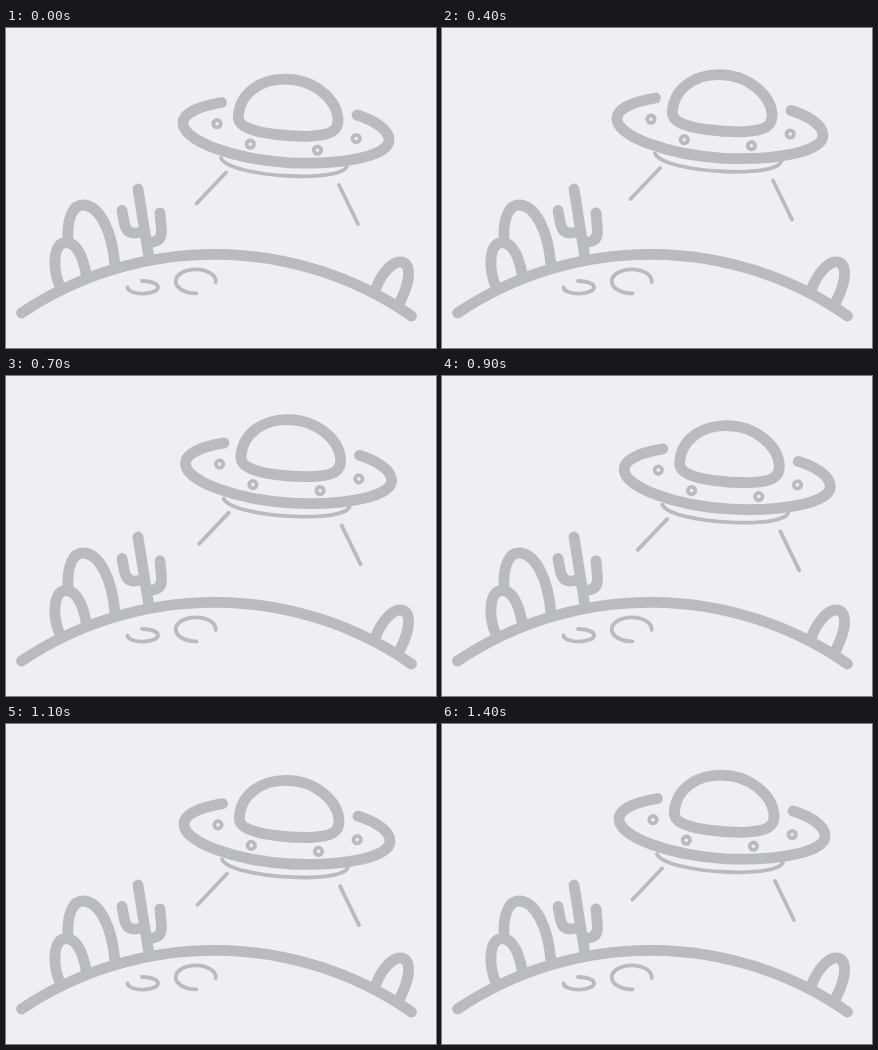
These frames come from a looping animation (430x320 px, 1500 ms). An HTML page:

```html
<!DOCTYPE html>
<html lang="en">
<head>
<meta charset="utf-8">
<title>Hovering saucer</title>
<style>
  html, body { margin: 0; width: 100%; height: 100%; overflow: hidden; background: #efeef4; }
  svg { display: block; fill: none; stroke: #b8bcbf; stroke-linecap: round; stroke-linejoin: round; }
  .bold { stroke-width: 10.8; }
  .fine { stroke-width: 3.8; }
</style>
</head>
<body>
<svg width="430" height="320" viewBox="0 0 430 320">
  <g class="bold" id="land">
    <path d="M15.5 285A346 346 0 0 1 405.500 288"/>
    <path d="M62 211C61 190 67 177 77 177C93 177 106 202 109 237"/>
    <path d="M54 259C46 240 47 214.500 60 214.500C70 214.500 77 228 80 246"/>
    <path d="M132 161L143 230M116 182.500L118.500 196Q121 206 130 205L138 203.500M154 185L155.500 202Q156 212.500 147 214L141 215"/>
    <path d="M370 260C376 245 386 234 394 234C405 234 406 250 394 274"/>
  </g>
  <g class="fine" id="craters">
    <path d="M121.500 259.500A15.300 6.300 0 1 0 136 253"/>
    <path d="M190.500 265.300A20 12 0 1 1 209.700 254"/>
  </g>
  <g id="saucer">
    <g class="bold">
      <path d="M232.500 86C235 65 254 51.200 279 51.200C308 51.200 330 71 332 90C333 103 325 107.500 302 108.300C277 108.500 254 105 243 100.500C234 97 231.500 93 232.500 86Z"/>
      <path d="M215.500 74.500C194 78 177 85 177 95C177 113 228 131.500 284 134.800C340 137 383 127.500 383 112C383 101 367 92 351 87"/>
    </g>
    <g class="fine">
      <path d="M215 130C219 139.500 250 146.500 285 148C318 149.500 339 145 341 138"/>
      <path d="M220 144.500L190.500 175.500M333 157L352 196"/>
      <circle cx="211" cy="95.700" r="3.700"/>
      <circle cx="244.300" cy="116.200" r="3.700"/>
      <circle cx="311.500" cy="122.200" r="3.700"/>
      <circle cx="350.200" cy="110.500" r="3.700"/>
    </g>
  </g>
</svg>
<script>
  const LOOP = 1500, STEP = 100;
  // Key points of the hover path; a smooth curve joins them.
  const keys = [
    { t: 0, x: 0, y: 0 },
    { t: 200, x: -2.5, y: 1.6 },
    { t: 400, x: -2, y: -4.5 },
    { t: 600, x: 0.8, y: -9.2 },
    { t: 900, x: 5.3, y: -1.6 },
    { t: 1100, x: 1, y: 5.2 },
    { t: 1400, x: 0, y: 0 }
  ];
  const saucer = document.getElementById("saucer");

  function slope(i, axis) {
    const a = keys[Math.max(i - 1, 0)], b = keys[Math.min(i + 1, keys.length - 1)];
    return (b[axis] - a[axis]) / (b.t - a.t);
  }

  // Cubic Hermite interpolation between the keys around time t.
  function offset(t, axis) {
    const i = Math.max(keys.findIndex(key => key.t >= t), 1);
    const a = keys[i - 1], b = keys[i];
    const span = b.t - a.t, p = (t - a.t) / span, q = 1 - p;
    return q * q * (1 + 2 * p) * a[axis] + p * p * (1 + 2 * q) * b[axis]
      + p * q * span * (q * slope(i - 1, axis) - p * slope(i, axis));
  }

  function draw(now) {
    const t = Math.floor(now % LOOP / STEP) * STEP;
    saucer.setAttribute("transform", `translate(${offset(t, "x")} ${offset(t, "y")})`);
    requestAnimationFrame(draw);
  }
  draw(performance.now());
</script>
</body>
</html>
```
